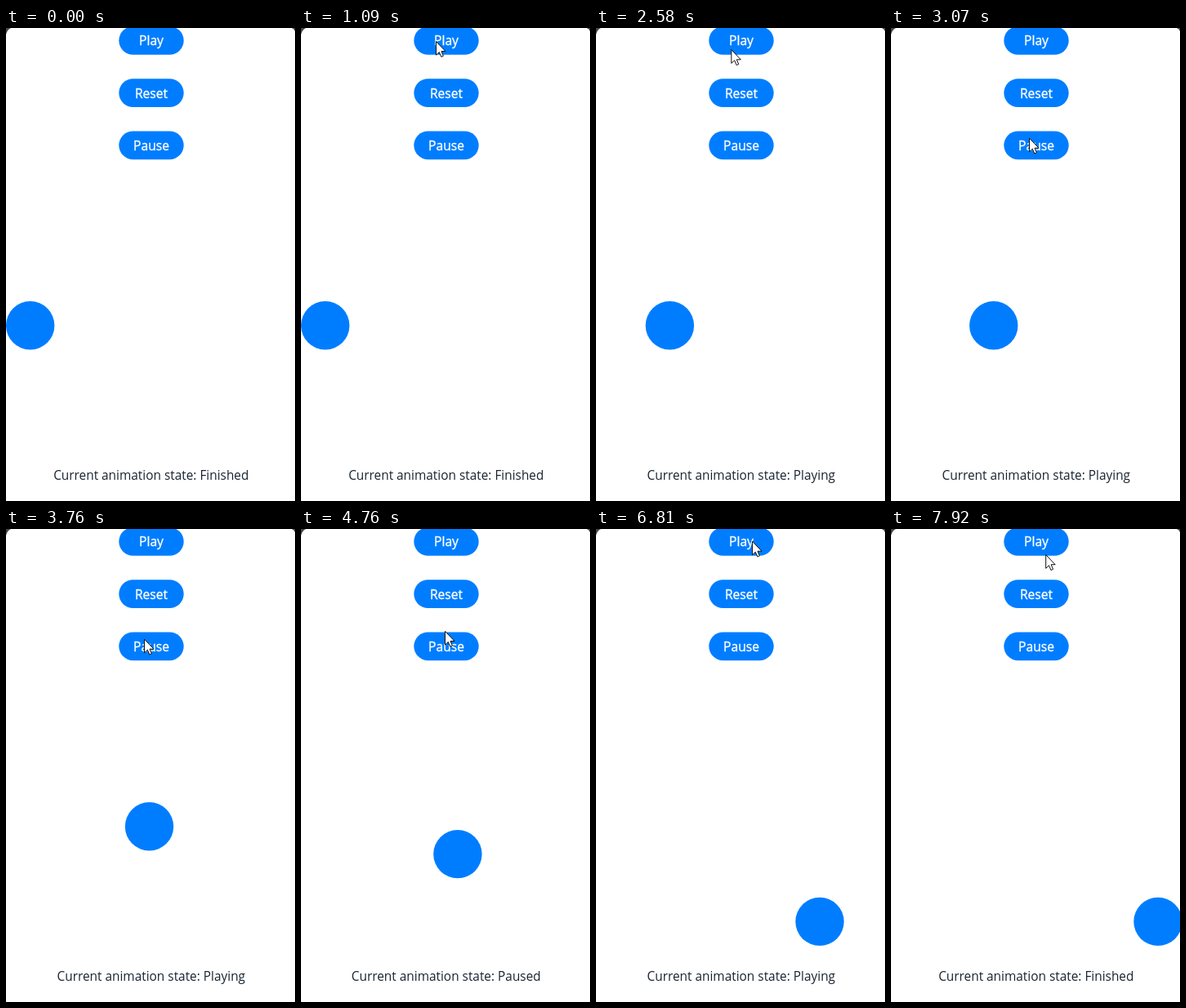
An HTML page for the animation above (7990 ms loop, 354 px wide and 580 px high).

```html
<!DOCTYPE html>
<html lang="en">
<head>
<meta charset="utf-8">
<title>Animation state</title>
<style>
  html, body { margin: 0; width: 100%; height: 100%; overflow: hidden; background: #fff; }
  svg { display: block; width: 100%; height: 100%; }
  text { font: 15.4px "Open Sans", "Noto Sans", sans-serif; text-anchor: middle; fill: #182431; }
  .label { font-size: 15.6px; fill: #fff; stroke: #fff; stroke-width: .35px; }
</style>
</head>
<body>
<svg viewBox="0 0 354 580">
  <rect width="354" height="580" fill="#fff"/>
  <g id="buttons"></g>
  <circle id="ball" r="29.7" fill="#007dff"/>
  <text id="status" x="177.8" y="553.6"></text>
  <path d="M0 0H6Q1.5 2 0 8ZM354 0H350Q353 1 354 4Z" fill="#454550"/>
  <g id="pointer">
    <circle id="ripple" r="12" fill="#fff" fill-opacity=".3"/>
    <path d="M.5 .5V17.2L4.3 13.6L6.8 19.4L9.4 18.3L7 12.6H12Z" fill="#fff" stroke="#111"/>
  </g>
</svg>
<script>
const LOOP = 7990, DURATION = 4120, PRESS = 150;
const START = 1740, PAUSE = 3988, RESUME = 5673;
const HELD = PAUSE - START;
const FINISH = RESUME + DURATION - HELD;
const SVG = "http://www.w3.org/2000/svg";
const $ = id => document.getElementById(id);

const mix = (a, b, u) => a + (b - a) * u;
const ramp = (t, from, to) => Math.min(1, Math.max(0, (t - from) / (to - from)));
const smooth = u => u * u * (3 - 2 * u);

function add(parent, tag, attrs) {
  const el = document.createElementNS(SVG, tag);
  for (const key in attrs) el.setAttribute(key, attrs[key]);
  return parent.appendChild(el);
}

// A click takes effect when the press is released.
const pressed = (t, release) => t >= release - PRESS && t < release;

const buttons = [
  { name: "Play", releases: [START, RESUME] },
  { name: "Reset", releases: [] },
  { name: "Pause", releases: [PAUSE] }
];
buttons.forEach((button, i) => {
  const mid = 15.4 + i * 64.2;
  button.pill = add($("buttons"), "rect", { x: 138.3, y: mid - 17.4, width: 79.4, height: 34.8, rx: 17.4 });
  add($("buttons"), "text", { x: 178, y: mid + 6, class: "label" }).textContent = button.name;
});
const releases = [1090, START, PAUSE, RESUME];

// Pointer moves between resting places; bend bows the path sideways.
const entry = { x: 299, y: 221 };
const moves = [
  { from: 330, to: 760, x: 165, y: 16, bend: -18 },
  { from: 2500, to: 2950, x: 169, y: 134.6, bend: 0 },
  { from: 4670, to: 5190, x: 191, y: 14.6, bend: 10 },
  { from: 7590, to: LOOP, x: 189, y: 32.5, bend: 0 }
];

function pointerAt(t) {
  let { x, y } = entry;
  for (const move of moves) {
    const u = ramp(t, move.from, move.to), e = smooth(u);
    x = mix(x, move.x, e) + move.bend * Math.sin(Math.PI * u);
    y = mix(y, move.y, e);
  }
  return `translate(${x} ${y})`;
}

function progress(t) {
  const elapsed = t < RESUME ? Math.min(t, PAUSE) - START : HELD + t - RESUME;
  return ramp(elapsed, 0, DURATION);
}

function state(t) {
  if (t < START || t >= FINISH) return "Finished";
  return t >= PAUSE && t < RESUME ? "Paused" : "Playing";
}

function draw(t) {
  const p = progress(t);
  $("ball").setAttribute("cx", mix(29.7, 327, p));
  $("ball").setAttribute("cy", mix(364.8, 481.4, smooth(ramp(p, 0.51, 0.61))));
  $("status").textContent = "Current animation state: " + state(t);

  for (const { pill, releases } of buttons) {
    pill.setAttribute("fill", releases.some(r => pressed(t, r)) ? "#0071e6" : "#007dff");
  }

  $("pointer").setAttribute("transform", pointerAt(t));
  $("pointer").style.display = t >= moves[0].from ? "" : "none";
  $("ripple").style.display = releases.some(r => pressed(t, r)) ? "" : "none";
}

const origin = performance.now();
function tick() {
  draw((performance.now() - origin) % LOOP);
  requestAnimationFrame(tick);
}
tick();
</script>
</body>
</html>
```
